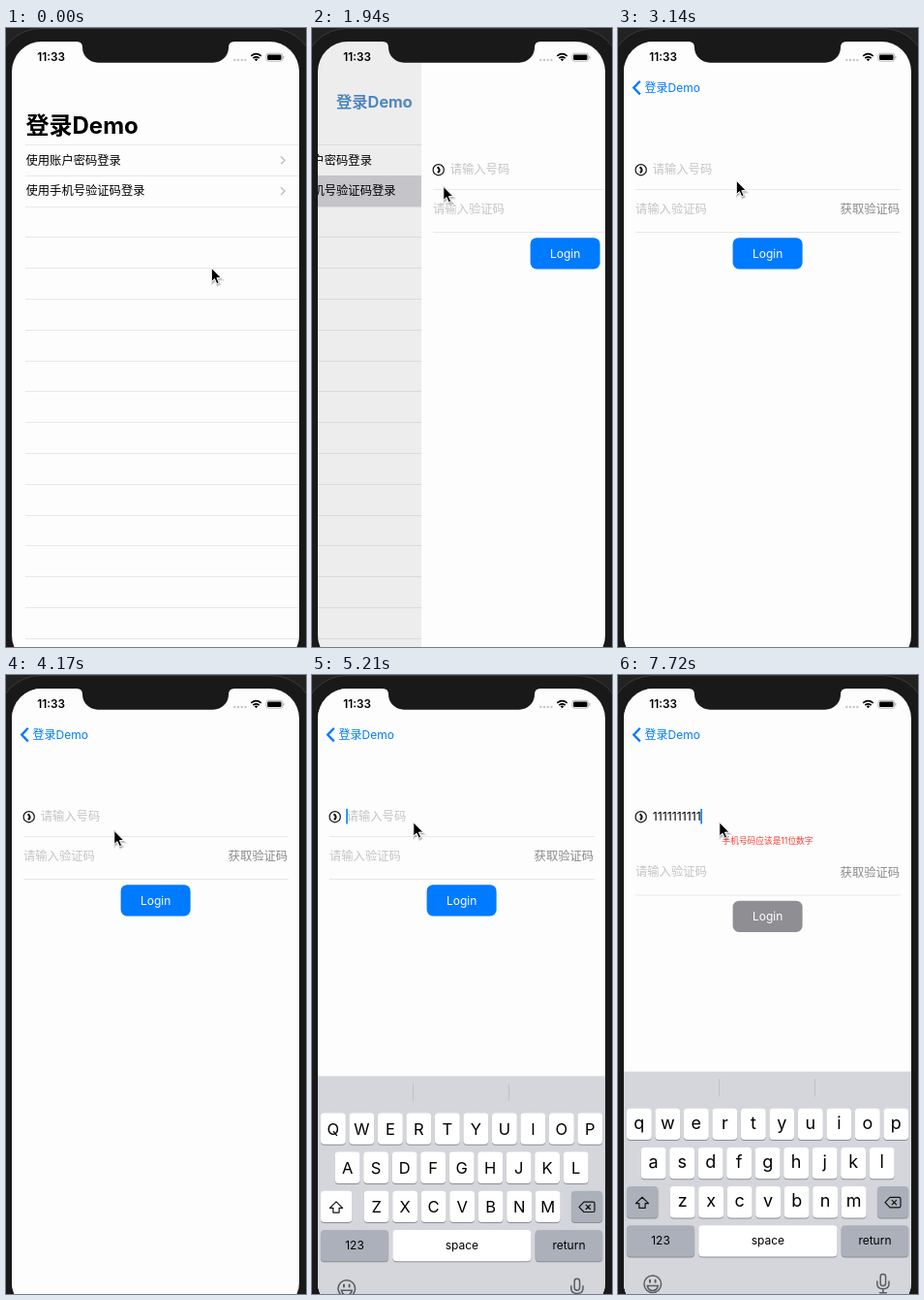
Write an HTML page that moves like this. It is 310 by 638 pixels and loops after 8 s.

```html
<!DOCTYPE html>
<html lang="zh">
<head>
<meta charset="utf-8">
<style>
html, body { margin: 0; width: 100%; height: 100%; overflow: hidden; background: #1d1d1d; }
svg { display: block; width: 100vw; height: 100vh; font-family: Inter, "Noto Sans CJK SC", "Noto Sans CJK", sans-serif; font-size: 12.3px; }
.mid { text-anchor: middle; }
.hint { fill: #c4c4c6; }
.line { fill: none; stroke: #e8e8e9; }
.blue { fill: #007aff; }
.ink { fill: none; stroke: #111; stroke-width: 1.2; stroke-linejoin: round; stroke-linecap: round; }
</style>
</head>
<body>
<svg viewBox="0 0 310 638">
  <defs>
    <clipPath id="screen"><rect x="6" y="14" width="297" height="643" rx="31"/></clipPath>
  </defs>
  <rect width="310" height="638" fill="#222"/>
  <rect x="-9" y=".5" width="328" height="700" rx="45" fill="#191919" stroke="#3a3a3a"/>

  <g clip-path="url(#screen)">
    <g id="list">
      <rect x="6" y="14" width="297" height="643" fill="#fdfdfd"/>
      <path id="rules" class="line"/>
      <rect id="picked" x="6" y="152" width="297" height="32" fill="#d1d1d6"/>
      <text x="20.5" y="140.6">使用账户密码登录</text>
      <text x="20.5" y="172.4">使用手机号验证码登录</text>
      <path d="M284 132.4l4 3.9-4 3.9M284 164.2l4 3.9-4 3.9" fill="none" stroke="#c2c2c5" stroke-width="1.5"/>
    </g>
    <rect id="dim" x="6" y="14" width="297" height="643"/>

    <g id="form">
      <rect x="6" y="14" width="297" height="643" fill="#fdfdfd"/>
      <circle cx="23.7" cy="146.2" r="5.6" fill="none" stroke="#111" stroke-width="1.2"/>
      <path d="M22.6 143.2q3.8 3 .4 6" fill="none" stroke="#111" stroke-width="2.1"/>
      <text id="phoneHint" class="hint" x="35.7" y="150.3">请输入号码</text>
      <text id="digits" x="35.7" y="150.4"></text>
      <rect id="caret" class="blue" y="138" width="1.6" height="15.5"/>
      <path id="underline" class="line" d="M18 166.5H292"/>
      <text id="error" class="mid" x="154.5" y="173.8" font-size="8.7" fill="#ff3b30">手机号码应该是11位数字</text>
      <g id="lower">
        <text class="hint" x="18" y="190.7">请输入验证码</text>
        <text x="229.6" y="191.3" fill="#8a8a8c">获取验证码</text>
        <path class="line" d="M18 210.5H292"/>
        <rect id="button" x="118.6" y="216.2" width="72" height="32.2" rx="6.5"/>
        <text class="mid" x="154.6" y="236.8" font-size="12" fill="#fff">Login</text>
      </g>
    </g>

    <text id="bigTitle" font-size="24" font-weight="700">登录Demo</text>
    <text id="backTitle" class="blue" font-size="12">登录Demo</text>
    <path id="backArrow" d="M22.8 54.8l-6.6 6.8 6.6 6.8" fill="none" stroke="#007aff" stroke-width="2.3"/>

    <g id="keyboard">
      <rect x="6" y="408.7" width="297" height="260" fill="#d4d6dc"/>
      <path d="M104.5 416.500v18M203.500 416.500v18" stroke="#bfc1c7"/>
      <text id="guess" class="mid" x="56.5" y="429.500" font-size="12"></text>
      <g id="keys"></g>
      <path id="shift" class="ink" d="M25 538.2l6.600 6.400h-3.500v4.800h-6.200v-4.800h-3.500z"/>
      <path class="ink" d="M281 538.400h9.500q1.500 0 1.500 1.500v7.400q0 1.500-1.500 1.500h-9.500l-5-5.200zM283.200 541.400l4.400 4.400m0-4.400l-4.400 4.400"/>
      <g fill="none" stroke="#5a5c61" stroke-width="1.5" stroke-linecap="round">
        <circle cx="35.800" cy="627.800" r="8.800"/>
        <path d="M30.300 629.500h11q-1 5-5.500 5t-5.500-5z"/>
        <path d="M33 623.800v2M38.600 623.800v2" stroke-width="2"/>
        <rect x="271.200" y="617.600" width="5.400" height="12" rx="2.700"/>
        <path d="M267.800 625v2.500q0 5.200 6.100 5.200t6.100-5.200v-2.500M273.900 632.700v4M270.500 636.700h6.800"/>
      </g>
    </g>

    <path d="M73 13H236V14Q230 14 230 20A16 15.700 0 0 1 214 35.700H95A16 15.700 0 0 1 79 20Q79 14 73 14Z" fill="#191919"/>
    <text x="32.300" y="34.200" font-size="11.800" font-weight="600">11:33</text>
    <path d="M236.300 33h12" stroke="#c6c6c8" stroke-width="2.400" stroke-dasharray="0 3.700" stroke-linecap="round"/>
    <g fill="none" stroke="#000" stroke-width="1.700">
      <path d="M253.300 28.800q5.200-4.200 10.400 0M255.300 31.100q3.200-2.500 6.400 0"/>
      <path d="M256.700 32.200q1.800-1.200 3.600 0l-1.800 2z" fill="#000" stroke="none"/>
    </g>
    <rect x="268.900" y="26.300" width="16.800" height="7.900" rx="2.200" fill="none" stroke="#a5a5a5" stroke-width=".8"/>
    <rect x="270.100" y="27.500" width="14.400" height="5.500" rx="1.200"/>
    <path d="M286.900 28.900v2.700" stroke="#a5a5a5"/>
  </g>

  <g id="cursor">
    <path d="M.5.8V15.200l3.200-3 2.300 5 2.600-1.200-2.300-4.800h4.500z" fill="#0003" stroke="#0002" stroke-width="2" transform="translate(.5 1.200)"/>
    <path d="M.3.300V14.600l3.200-3 2.300 5.100 2.400-1.100-2.300-5h4.500z" fill="#000" stroke="#fff" stroke-width="1"/>
  </g>
</svg>
<script>
const LOOP = 8000, STEP = 148.4;
const $ = id => document.getElementById(id);
const set = (id, attrs) => { for (const k in attrs) $(id).setAttribute(k, attrs[k]); };
const show = (id, on) => set(id, { visibility: on ? "visible" : "hidden" });

// Critically damped spring from 0 to 1
const spring = ms => {
  const x = 18.26 * Math.max(0, ms) / 1000;
  return 1 - (1 + x) * Math.exp(-x);
};

// Pointer path: step, x, y
const PATH = [
  [0, 212, 247], [1, 187, 214], [2, 150, 170], [3, 138, 153], [4, 138, 153], [6, 135.500, 163],
  [18, 135.500, 163], [19, 130, 161], [20, 124, 158], [21, 122, 157], [22, 122, 157],
  [24, 206, 197], [25, 221, 202], [26, 204, 194], [28, 111.500, 160], [30, 104.500, 151.500]
];
function pointer(n) {
  const i = PATH.findIndex(p => p[0] >= n);
  if (i < 0) return PATH[PATH.length - 1].slice(1);
  if (i === 0) return PATH[0].slice(1);
  const a = PATH[i - 1], b = PATH[i], k = (n - a[0]) / (b[0] - a[0]);
  return [1, 2].map(j => a[j] + (b[j] - a[j]) * k);
}

// Steps at which another digit is typed
const TYPED = [39, 40, 41, 43, 44, 45, 47, 48, 50, 52];

let rules = "";
for (let i = 0; i < 17; i++) rules += `M20 ${Math.round(120 + 31.8 * i) + 0.5}H303`;
set("rules", { d: rules });

const GREY = "#abb0ba";
let keys = "";
function key(x, y, w, label, fill = "#fff", id = "") {
  keys += `<rect x="${x}" y="${y + 1}" width="${w}" height="32.300" rx="4" fill="#8b8d92"/>
    <rect id="${id}" x="${x}" y="${y}" width="${w}" height="32.300" rx="4" fill="${fill}"/>`;
  const letter = label.length === 1;
  if (label) keys += `<text class="mid${letter ? " letter" : ""}" x="${x + w / 2}" y="${y + (letter ? 0 : 19.800)}" data-y="${y}" font-size="12">${label}</text>`;
}
["qwertyuiop", "asdfghjkl", "zxcvbnm"].forEach((row, r) => {
  [...row].forEach((c, i) => key([8.900, 23.700, 53.700][r] + 29.500 * i, 446.700 + 40.200 * r, 25.900, c));
});
key(8.900, 527.100, 32.500, "", GREY, "shiftKey");
key(267.900, 527.100, 32.300, "", GREY);
key(8.900, 567.300, 70.200, "123", GREY);
key(83.300, 567.300, 143.200, "space");
key(230.700, 567.300, 69.500, "return", GREY);
$("keys").innerHTML = keys;
const letters = [...document.querySelectorAll(".letter")];

function setCase(upper) {
  for (const el of letters) {
    el.textContent = upper ? el.textContent.toUpperCase() : el.textContent.toLowerCase();
    el.setAttribute("font-size", upper ? 16.500 : 18);
    el.setAttribute("y", +el.dataset.y + (upper ? 22.200 : 21));
  }
  set("shiftKey", { fill: upper ? "#fff" : GREY });
  set("shift", { fill: upper ? "#000" : "none" });
}

function draw(n) {
  const time = n * STEP;
  const push = spring(time - 1810), up = spring(time - 4871);
  const count = TYPED.filter(s => s <= n).length, typed = count > 0;

  show("picked", n >= 11);
  set("list", { transform: `translate(${-89 * push} 0)` });
  set("dim", { opacity: 0.1 * push });
  set("form", { transform: `translate(${297 * (1 - push)} 0)` });

  const x = 20.500 + 7 * push, y = 109.200 - 43.200 * push, size = 1 - push / 2;
  set("bigTitle", { opacity: 1 - push, transform: `translate(${x} ${y}) scale(${size})` });
  set("backTitle", { opacity: push, transform: `translate(${x} ${y}) scale(${size * 2})` });
  set("backArrow", { opacity: Math.max(0, (push - 0.65) / 0.35) });

  set("keyboard", { transform: `translate(0 ${249 * (1 - up)})` });
  show("keyboard", up > 0);
  setCase(!typed);

  $("digits").textContent = "1".repeat(count);
  show("phoneHint", !typed);
  show("underline", !typed);
  show("error", typed);
  set("lower", { transform: `translate(0 ${typed ? 16.500 : 0})` });
  set("button", { fill: typed ? "#8e8e93" : "#007aff" });
  set("caret", { x: 35.300 + (typed ? $("digits").getComputedTextLength() : 0) });
  show("caret", up > 0 && n !== 37 && n !== 38);
  $("guess").textContent = n === 41 || n === 50 ? `“${"1".repeat(count)}”` : "";

  set("cursor", { transform: `translate(${pointer(n)})` });
}

let last = -1;
function tick(now) {
  const n = Math.min(52, Math.floor(now % LOOP / STEP));
  if (n !== last) draw(last = n);
  requestAnimationFrame(tick);
}
draw(0);
requestAnimationFrame(tick);
</script>
</body>
</html>
```
